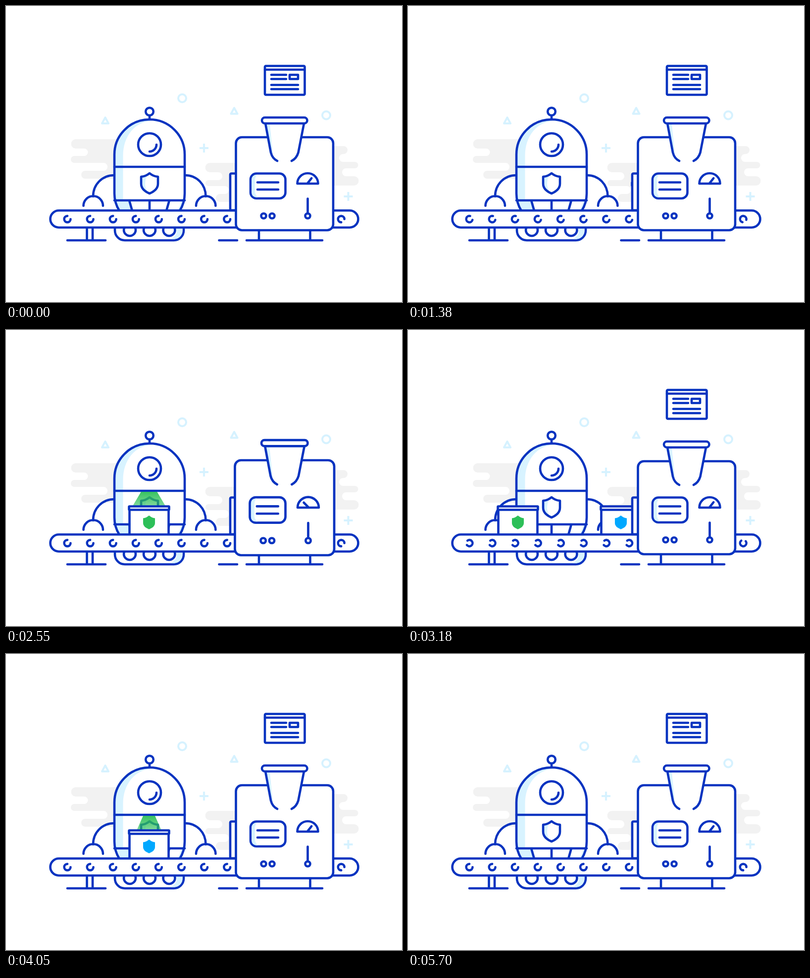
Animation of 800 by 600 pixels, one loop 5.76 s. Source, as an HTML page:

```html
<!DOCTYPE html>
<html lang="en">
<head>
<meta charset="utf-8">
<title>Inspection line</title>
<style>
  html, body { margin: 0; width: 100%; height: 100%; overflow: hidden; background: #fff; }
  svg { display: block; width: 100vw; height: 100vh; }
  .ink { fill: none; stroke: #0733c0; stroke-width: 4.6; stroke-linecap: round; stroke-linejoin: round; }
  .paper { fill: #fff; }
  .tint { fill: #d8f3ff; stroke: none; }
  .decor { fill: none; stroke: #d6f2ff; stroke-width: 4; stroke-linejoin: round; }
  .cloud { fill: #f2f2f2; }
</style>
</head>
<body>
<svg viewBox="0 0 800 600">
  <defs>
    <clipPath id="aboveRim"><rect x="500" y="0" width="130" height="231"/></clipPath>
    <clipPath id="bodyClip"><path d="M219 394V301a71 71 0 0 1 142 0V380Q361 399 351 415H229Q219 399 219 380Z"/></clipPath>
    <linearGradient id="beamFill" x1="0" y1="0" x2="0" y2="1">
      <stop offset="0" stop-color="currentColor" stop-opacity=".95"/>
      <stop offset="1" stop-color="currentColor" stop-opacity=".6"/>
    </linearGradient>
    <path id="badge" d="M0-14Q6-9 12-8.500V2Q12 9 0 14Q-12 9-12 2V-8.500Q-6-9 0-14Z"/>
  </defs>

  <g class="cloud">
    <path d="M141 270H235V350H160a8 8 0 0 1 0-16h37a8 8 0 0 0 0-16H138a7 7 0 0 1 0-14h20a7.500 7.500 0 0 0 0-15H141a9.500 9.500 0 0 1 0-19Z"/>
    <path d="M412 318H465V397H432a8 8 0 0 1 0-16h10a8 8 0 0 0 0-16H409a6 6 0 0 1 0-12h20a8 8 0 0 0 0-16H412a9.500 9.500 0 0 1 0-19Z"/>
    <path d="M655 284H682a8 8 0 0 1 0 16h-1a8 8 0 0 0 0 16H705a6.500 6.500 0 0 1 0 13H687a8 8 0 0 0 0 16H703a9.500 9.500 0 0 1 0 19H655Z"/>
  </g>
  <g class="decor">
    <path d="M200.500 226L207 238H194ZM461 206.500L467.500 218.500H454.500Z"/>
    <circle cx="356" cy="187" r="8"/><circle cx="647" cy="221.500" r="8"/>
    <path d="M391 288h18M400 279v18M682.500 386h18M691.500 377v18"/>
  </g>

  <!-- Robot -->
  <g class="ink">
    <path d="M219 343C194 343 176 362 176 386M156.500 405a19.700 19.700 0 0 1 39.400 0"/>
    <path d="M361 343C386 343 403.500 362 403.500 386M384 405a19.700 19.700 0 0 1 39.400 0"/>
    <g clip-path="url(#bodyClip)" stroke="none">
      <path class="paper" d="M210 220H370V420H210Z"/>
      <path class="tint" d="M210 220H296V232C258 235 236.500 266 236.500 303V394H249L255 420H210Z"/>
      <path class="tint" d="M361 395H354Q352 405 346 415H361Z"/>
    </g>
    <path d="M229 415Q219 399 219 380V301a71 71 0 0 1 142 0V380Q361 399 351 415"/>
    <path d="M219 326H361M219 394H361M249 394L255 415M290 394V415M330 394L324 415M290 222V230"/>
    <circle cx="290" cy="214" r="7.800"/>
    <circle class="paper" cx="290" cy="281" r="23"/>
    <path d="M304 281A14 14 0 0 1 290 295"/>
    <path class="tint" d="M273 346L285 341Q281 352 281 362Q282 372 288 379Q273 373 273 360Z"/>
    <path d="M290 339Q298 345.500 307 346V360Q307 373 290 380Q273 373 273 360V346Q282 345.500 290 339Z"/>
    <path class="paper" d="M220 447V455a20 20 0 0 0 20 20H339a20 20 0 0 0 20-20V447Z"/>
    <path class="tint" d="M345 451H356.500V455Q356 470 341 472.500H333Q345 467 345 455Z"/>
    <g class="paper">
      <circle cx="250" cy="454" r="12"/><circle cx="290" cy="454" r="12"/><circle cx="329.500" cy="454" r="12"/>
    </g>
  </g>

  <path id="beam" fill="url(#beamFill)"/>

  <g id="boxes"></g>

  <!-- Conveyor -->
  <g class="ink">
    <path d="M163.500 449V475M175 449V475M124 475H201M430.500 475H467M486 475H639M511 456V475M614.500 456V475"/>
    <rect class="paper" x="89.500" y="414.500" width="622" height="34.500" rx="17.250"/>
    <g id="rollers"></g>
    <path class="paper" d="M470 414H453V342Q453 339.500 456 339.500H470Z"/>
  </g>

  <!-- Machine -->
  <g id="machine" class="ink">
    <rect class="paper" x="464.500" y="266" width="196.500" height="188.500" rx="12"/>
    <path class="paper" stroke="none" d="M524 238L535 297Q538 309 548 314H577Q587 309 590 297L602 238Z"/>
    <path class="tint" d="M526 240H533L539 299L536 297Z"/>
    <path d="M524 238L535 297Q538 309 548 314M602 238L590.500 297Q587 309 577 314"/>
    <rect class="paper" x="517" y="226" width="91.500" height="12" rx="6"/>
    <rect x="494" y="339.500" width="70.500" height="50.500" rx="12"/>
    <path class="tint" d="M507 342Q503 347 503 354V376Q503 383 509 387.700H506Q496.300 387.700 496.300 378V352Q496.300 342 507 342Z"/>
    <path d="M508 357.500H550M508 372H550M588.500 360a21 21 0 0 1 42 0ZM609.500 390.500V420"/>
    <path id="needle" d="M609.500 359V346.500"/>
    <circle cx="520.500" cy="425.500" r="5"/><circle cx="537.500" cy="425.500" r="5"/><circle cx="609.500" cy="425.500" r="5"/>
  </g>

  <g clip-path="url(#aboveRim)">
    <g id="page" class="ink">
      <rect class="paper" x="523" y="121.500" width="80.500" height="58.500" rx="2"/>
      <path d="M523 129H603M536 139.500H566M536 148H566M536 160H590M536 168.500H590M573 139.500H590V148H573Z"/>
    </g>
  </g>
</svg>

<script>
const LOOP = 5760, STEP = 30;
const SHIFT = 830, STRIDE = 208, SCAN_X = 289;
const SHIFTS = [1307, 2861, 4578];
const FEEDS = [0, 1875];
const BLUE = '#00a8ff', GREEN = '#2dbf58', RED = '#ff0d14';
// Each item enters on one shift, is scanned, and leaves on the next.
const ITEMS = [
  { enter: SHIFTS[0], leave: SHIFTS[1], scan: 2190, verdict: GREEN },
  { enter: SHIFTS[1], leave: SHIFTS[2], scan: 3900, verdict: RED }
];
const SCAN = 600, FALL = 180;
const REST = 38;
const NEEDLE = [[440, REST], [540, 18], [700, -48], [950, 63], [1250, REST]];

const $ = id => document.getElementById(id);
const ramp = (t, a, b) => Math.min(1, Math.max(0, (t - a) / (b - a)));
const ease = p => (1 - Math.cos(Math.PI * p)) / 2;
const mix = (a, b, p) => a + (b - a) * p;
const shiftAt = (t, start) => ease(ramp(t, start, start + SHIFT));

function track(keys, t) {
  let value = keys[0][1];
  for (let i = 1; i < keys.length; i++)
    value = mix(value, keys[i][1], ease(ramp(t, keys[i - 1][0], keys[i][0])));
  return value;
}

$('boxes').innerHTML = ITEMS.map(() => `<g>
  <path class="ink paper" d="M-39.500-22V30H39.500V-22"/>
  <rect class="ink paper" x="-40.500" y="-28.500" width="81" height="7" rx="1"/>
  <use href="#badge" y="4"/></g>`).join('');
const boxes = [...$('boxes').children];

const slots = [0, 1, 2, 3, 4, 5, 6, 7, 12].map(i => 124 + 46.1 * i);
$('rollers').innerHTML = slots.map(() => '<path d="M6.400 0A6.400 6.400 0 1 1 0-6.400"/>').join('');
const rollers = [...$('rollers').children];

function drawBox(el, item, t) {
  const left = shiftAt(t, item.leave);
  const end = item.leave + SHIFT;
  const fall = ramp(t, end, end + FALL) ** 1.4;
  let x = SCAN_X + STRIDE * (1 - shiftAt(t, item.enter) - left);
  const tip = ramp(-x, -112, -81) ** 2;
  x = mix(x + 3 * tip, 60, fall);
  const y = mix(386 - 2 * tip, 429, fall);
  const turn = mix(-10 * tip, -70, fall);
  el.setAttribute('transform', `translate(${x} ${y}) rotate(${turn})`);
  el.setAttribute('opacity', t < item.enter ? 0 : 1 - ramp(t, end + 120, end + 285));
  el.lastElementChild.setAttribute('fill', t < item.scan + SCAN / 2 ? BLUE : item.verdict);
}

function drawBeam(t) {
  const beam = $('beam');
  const item = ITEMS.find(i => t > i.scan && t < i.scan + SCAN);
  beam.style.display = item ? '' : 'none';
  if (!item) return;
  const open = Math.sin(Math.PI * (t - item.scan) / SCAN);
  const top = 17 * open, foot = 35 * open;
  const color = t < item.scan + SCAN / 2 ? GREEN : item.verdict;
  beam.setAttribute('d', `M${SCAN_X - top} 328H${SCAN_X + top}L${SCAN_X + foot} 357H${SCAN_X - foot}Z`);
  document.querySelectorAll('#beamFill stop').forEach(s => s.setAttribute('stop-color', color));
}

function drawFeed(t) {
  const f = t - (t < FEEDS[1] ? FEEDS[0] : FEEDS[1]);
  const drop = f < 740 ? 115 * ramp(f, 100, 510) ** 2 : 0;
  $('page').setAttribute('transform', `translate(0 ${drop})`);
  $('page').setAttribute('opacity', f < 540 ? 1 : ease(ramp(f, 740, 1100)));
  const pulse = 1 + 0.035 * Math.sin(Math.PI * ramp(f, 540, 710));
  $('machine').setAttribute('transform', `translate(562.7 360) scale(${pulse}) translate(-562.7 -360)`);
  $('needle').setAttribute('transform', `rotate(${track(NEEDLE, f)} 609.500 359)`);
}

function draw(t) {
  drawFeed(t);
  ITEMS.forEach((item, i) => drawBox(boxes[i], item, t));
  drawBeam(t);
  const spin = 720 * SHIFTS.reduce((sum, s) => sum + shiftAt(t, s), 0);
  rollers.forEach((el, i) => {
    const turn = spin + (i === slots.length - 1 ? 90 : 0);
    el.setAttribute('transform', `translate(${slots[i]} 432) rotate(${turn})`);
  });
}

const start = performance.now();
function tick() {
  const t = (performance.now() - start) % LOOP;
  draw(Math.floor(t / STEP) * STEP);
  requestAnimationFrame(tick);
}
tick();
</script>
</body>
</html>
```
